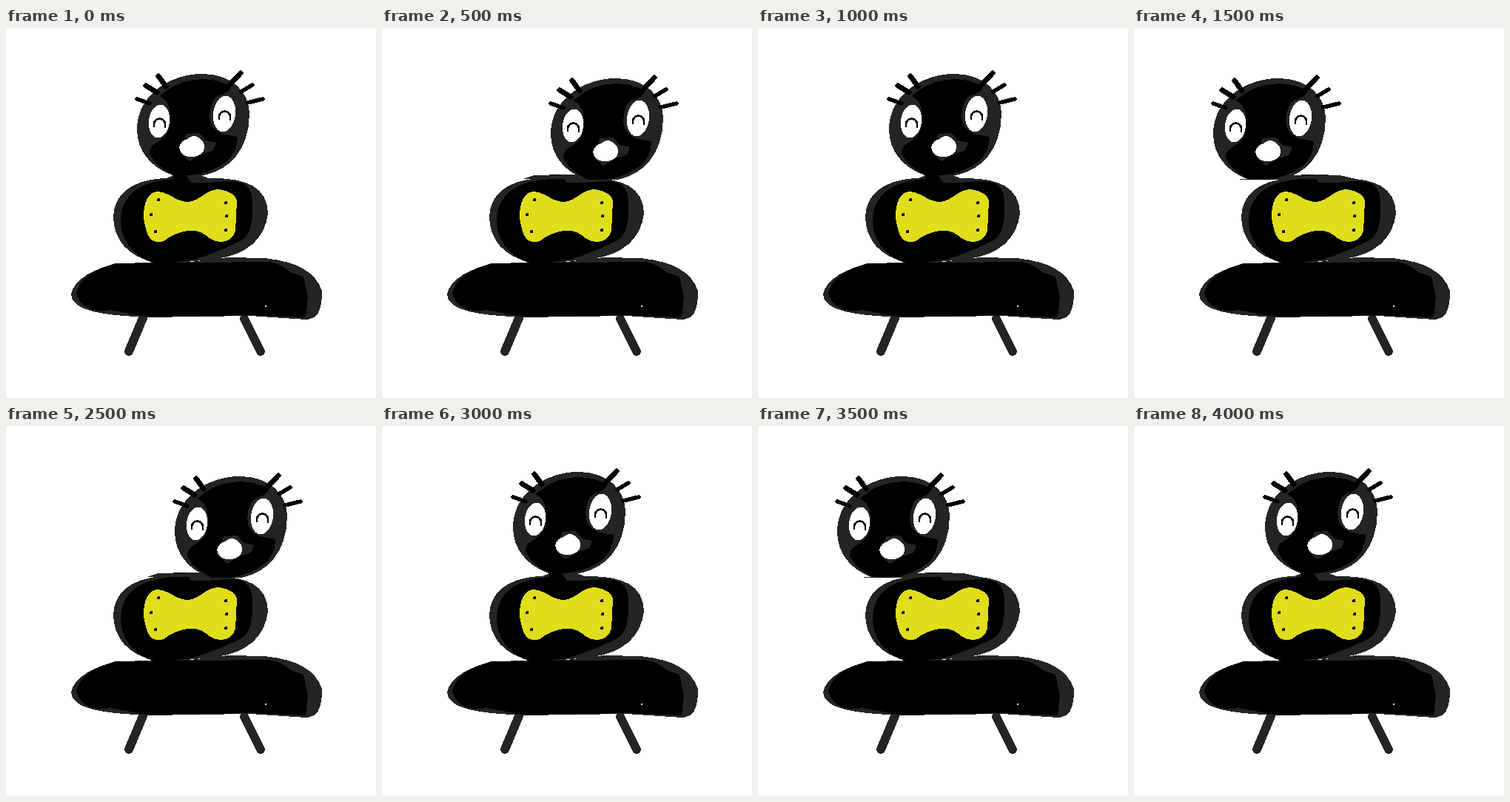
Recreate the animation shown at these times as an HTML page. Size 500 by 500 pixels, loop 4.5 s.

```html
<!DOCTYPE html>
<html lang="en">
<head>
<meta charset="utf-8">
<style>
  html, body { margin: 0; width: 100%; height: 100%; overflow: hidden; background: #fff; }
  svg { display: block; width: 100vw; height: 100vh; }
  .grey { fill: #252423; }
  .white { fill: #fff; }
  .yellow { fill: #e0de1b; }
  .line { fill: none; stroke: #000; stroke-linecap: round; }
  .leg { fill: none; stroke: #252423; stroke-width: 12; stroke-linecap: round; }
</style>
</head>
<body>
<svg viewBox="0 0 500 500" shape-rendering="crispEdges">
  <clipPath id="cut"><rect x="150" y="40" width="220" height="159"/></clipPath>

  <g id="legs">
    <path class="leg" d="M185 392L166 437M322 393L344 437"/>
  </g>

  <g id="base">
    <path class="grey" d="M88 360C92 338 120 326 148 318L250 316L300 310L350 311C395 316 418 330 427 355C427 385 420 393 405 394L330 389L190 391C140 388 90 385 88 360Z"/>
    <path d="M95 358C100 336 122 325 150 318L355 316Q372 318 385 330L402 336L408 364L405 391L330 388L195 391L140 381C118 386 98 376 95 358Z"/>
    <circle class="white" cx="351" cy="376" r="1"/>
  </g>

  <g id="torso">
    <path class="grey" d="M145 255C146 228 165 206 212 203L280 203C325 203 353 215 354 250C350 286 325 306 285 312C250 316 220 318 200 316C165 310 145 285 145 255Z"/>
    <path class="grey" d="M228 198H262L275 204H215Z"/>
    <path d="M155 255C158 225 180 207 226 204V198H243L250 209C275 211 300 204 318 209C334 214 334 235 333 255C328 290 320 285 295 298C270 308 250 318 200 318C170 308 153 285 155 255Z"/>
    <path class="grey turned" d="M205 199H278L300 204H190Z"/>
    <path class="yellow" d="M186 250C188 228 196 221 206 221C222 223 230 235 246 235C262 234 270 218 288 218Q310 222 312 234L310 274C306 290 288 293 275 284Q262 272 246 274Q228 276 213 288Q198 292 192 280Q185 262 186 250Z"/>
    <path class="line" stroke-width="4" d="M206 232h.1M196 252h.1M202 275h.1M297 236h.1M298 254h.1M297 273h.1"/>
  </g>

  <g id="head">
    <path class="grey turned" d="M213 198h52v1h-52Z"/>
    <g clip-path="url(#cut)">
      <path class="grey" d="M177 134C179 90 222 62 265 62C305 62 329 86 329 116C328 168 300 194 262 200L225 199C195 188 176 165 177 134Z"/>
      <path d="M218 84C240 66 285 64 304 80C300 92 284 88 280 98C272 115 272 138 296 144L313 147C314 175 290 190 262 197L232 202C214 192 200 184 194 170C192 150 222 158 222 125C222 108 220 98 207 92Z"/>
      <path class="grey" d="M243 143L262 142L270 152L284 155L280 165L266 170L248 180L236 170Z"/>
      <path class="white" d="M234 161Q237 151 246 150Q252 143 260 148Q269 153 268 163Q265 174 250 174Q236 174 234 161Z"/>
      <path class="line" stroke-width="7" d="M206 65L216 79M189 78L204 87M317 61L303 76"/>
      <path class="line" stroke-width="5.5" d="M177 96L194 102M333 77L318 86M347 96L326 101"/>
      <g id="eyes"></g>
    </g>
  </g>
</svg>
<script>
const head = document.getElementById('head');
const turned = document.querySelectorAll('.turned');

// White oval with a smiling arc
const eye = (x, y, rx, ry) =>
  `<ellipse class="white" cx="${x}" cy="${y}" rx="${rx}" ry="${ry}" transform="rotate(7 ${x} ${y})"/>
   <path class="line" stroke-width="2.6" d="M${x - 7} ${y + 7}v-3a7.5 7.5 0 0 1 15 0v4"/>`;
document.getElementById('eyes').innerHTML = eye(207, 126, 14, 22.5) + eye(295, 116, 15, 24.5);

// The head hops every half second: middle, right, middle, left
const STEP = 500, LOOP = 4500;
const MID = [0, 0], RIGHT = [51, 6], LEFT = [-70, 6];
const poses = [MID, RIGHT, MID, LEFT];

function draw(t) {
  const pose = poses[Math.floor((t % LOOP) / STEP) % poses.length];
  head.setAttribute('transform', `translate(${pose})`);
  turned.forEach(el => el.setAttribute('visibility', pose === MID ? 'hidden' : 'visible'));
}

const start = performance.now();
function tick() {
  draw(performance.now() - start);
  requestAnimationFrame(tick);
}
tick();
</script>
</body>
</html>
```
